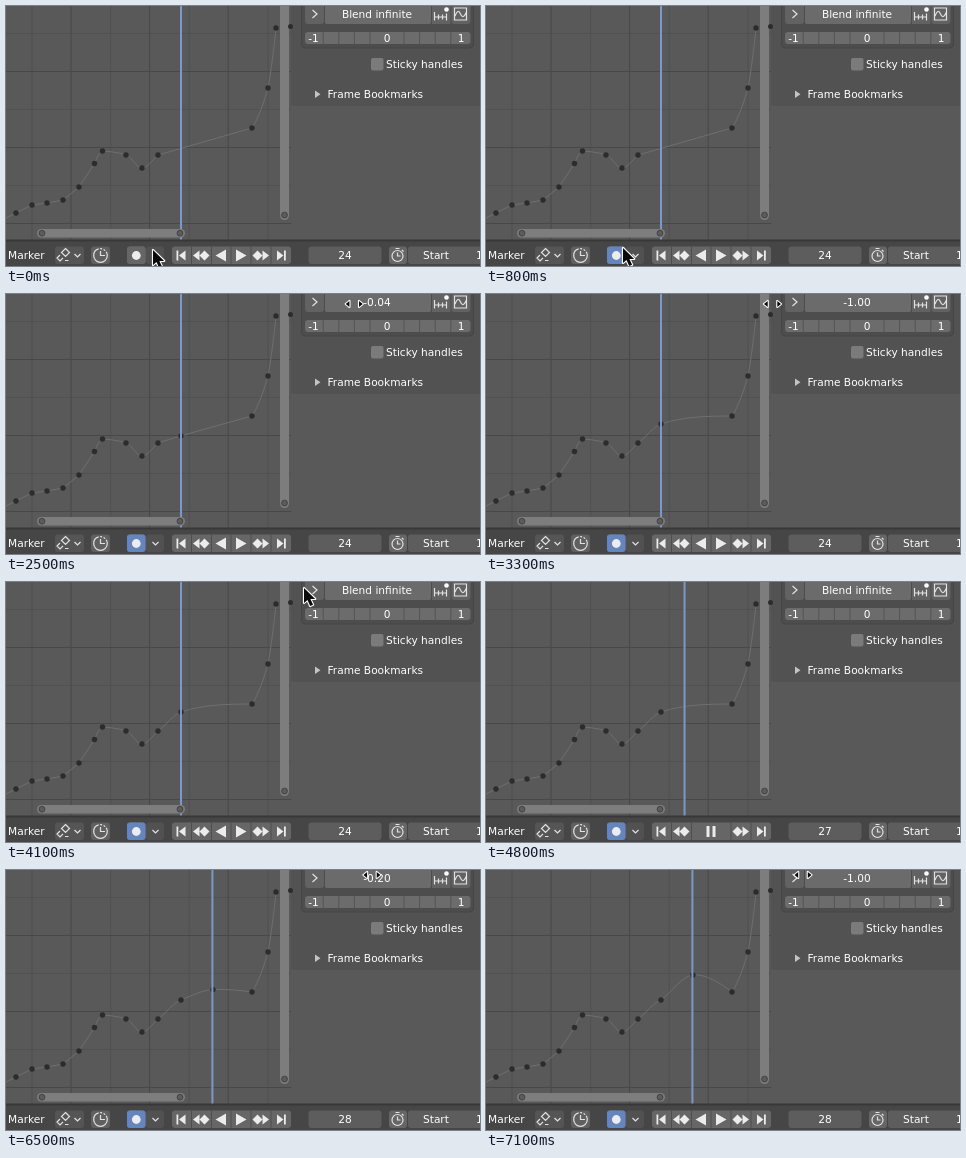
These frames come from a looping animation (474x260 px, 7200 ms). An HTML page:

```html
<!DOCTYPE html>
<html lang="en">
<head>
<meta charset="utf-8">
<title>Curve editor</title>
<style>
html, body { margin: 0; width: 100%; height: 100%; overflow: hidden; background: #595959; }
svg { display: block; width: 474px; height: 260px; }
text { font: 10.6px "DejaVu Sans", "Noto Sans", sans-serif; fill: #fff; }
.mid { text-anchor: middle; }
.icon { fill: #ececec; }
.line { fill: none; stroke: #e2e2e2; stroke-width: 1.2; }
.key { fill: #2c2c2c; }
.pointer { fill: #0a0a0a; stroke: #fff; stroke-width: 2.2; stroke-linejoin: round; paint-order: stroke; }
</style>
</head>
<body>
<svg viewBox="0 0 474 260" xmlns="http://www.w3.org/2000/svg">
  <g id="graph">
    <rect width="286" height="236" fill="#595959"/>
    <g id="grid"></g>
    <path id="curve" fill="none" stroke="#6f6f6f"/>
    <g id="keys"></g>
    <circle id="keyA" class="key" cx="175" r="2.7"/>
    <circle id="keyB" class="key" cx="207" r="2.7"/>
    <g id="playhead">
      <rect x="-1" width="2" height="234" fill="#7c98c8"/>
    </g>
    <g fill="#7d7d7d">
      <rect x="274" y="-10" width="9" height="224" rx="4.5"/>
      <rect x="31" y="223" width="148" height="8.5" rx="4.2"/>
    </g>
    <g fill="#5c5c5c" stroke="#444">
      <circle cx="278.5" cy="209" r="2.9"/>
      <circle cx="36" cy="227.2" r="2.9"/>
      <circle cx="174" cy="227.2" r="2.9"/>
    </g>
  </g>

  <g id="panel">
    <rect x="285" width="189" height="236" fill="#595959"/>
    <rect x="285" width="189" height="100" fill="#525252"/>
    <circle class="key" cx="284.5" cy="20.5" r="2.5"/>
    <rect x="295.5" y="-8" width="172" height="50" rx="4" fill="#4d4d4d" stroke="#444"/>
    <rect x="299" y="-6" width="19" height="24" rx="3" fill="#626262"/>
    <path class="line" d="M306.500 4l4.500 4-4.500 4"/>
    <rect id="slider" x="319" y="-6" width="106" height="24" rx="2"/>
    <text id="label" class="mid" x="371" y="11.500"></text>
    <rect x="426" y="-6" width="18.500" height="24" fill="#626262"/>
    <rect x="445.500" y="-6" width="19" height="24" rx="3" fill="#626262"/>
    <path class="line" d="M428.500 6v8.500M440.500 7.500v7M428 11h13M432.500 8.500v5M436.500 8.500v5"/>
    <circle cx="440.500" cy="3.500" r="2.300" fill="#fff"/>
    <path class="line" d="M448.500 2h12v12h-12zM449 10q3-8 5.500-2t6-2"/>
    <rect x="299" y="26" width="165.500" height="12" rx="3" fill="#6c6c6c"/>
    <g id="ticks"></g>
    <text class="mid" x="307.500" y="35.500">-1</text>
    <text class="mid" x="381" y="35.500">0</text>
    <text class="mid" x="455" y="35.500">1</text>
    <rect x="365" y="52" width="12.500" height="12.500" rx="2" fill="#7b7b7b"/>
    <text x="380" y="61.500">Sticky handles</text>
    <path d="M309 84.500l5.500 3.700-5.500 3.700z" fill="#c4c4c4"/>
    <text x="321.500" y="92">Frame Bookmarks</text>
  </g>

  <g id="bar">
    <rect y="234" width="474" height="26" fill="#464646"/>
    <rect y="233.500" width="474" height="2" fill="#383838"/>
    <text x="2" y="253">Marker</text>
    <g id="buttons"></g>
    <rect id="record" x="121" y="240.500" width="18.500" height="17.500" rx="3"/>
    <circle class="icon" cx="130.300" cy="249.500" r="4.400"/>
    <path class="line" d="M59.500 242.500l4 4-4 4-4-4zM54 249l-3 3 3 3 3-3M59 254.500h3.500"/>
    <path class="line" d="M68.500 248l3 3 3-3M146.500 248l3 3 3-3"/>
    <circle class="line" cx="94.500" cy="249.500" r="6.800" stroke-width="1.600" stroke-dasharray="30 1.500 2 1.500 2 1.500"/>
    <path class="line" d="M94.500 245v4.500h4.500"/>
    <g class="icon">
      <path d="M170.500 244.500h1.800v10h-1.800zM179.500 244.500v10l-6.500-5z"/>
      <path d="M193.500 244.500v10l-6.500-5zM198.500 244.500l5 5-5 5-5-5z"/>
      <path d="M256.500 244.500v10l6.500-5zM251.500 244.500l5 5-5 5-5-5z"/>
      <path d="M278 244.500h1.800v10h-1.800zM271 244.500v10l6.500-5z"/>
    </g>
    <g id="stopped" class="icon">
      <rect x="224.500" y="240.500" width="1" height="17.500" fill="#4e4e4e"/>
      <path d="M220 243.500v12l-10.500-6zM230 243.500v12l10.500-6z"/>
    </g>
    <path id="playing" class="icon" d="M220.500 244h3v11h-3zM226.500 244h3v11h-3z"/>
    <text id="frame" class="mid" x="339" y="253"></text>
    <circle class="line" cx="391.500" cy="250" r="5.500"/>
    <path class="line" d="M391.500 246.500v3.500h3M389.500 242.500h4M396 244l1.500 1.500"/>
    <text x="417" y="253">Start</text>
    <text x="470" y="253">1</text>
  </g>

  <path id="arrow" class="pointer" d="M0 0v15l3.500-3 2.700 6 2.900-1.200-2.700-5.900h4.800z"/>
  <path id="grip" class="pointer" d="M-4.800-3v6l-3.700-3zM4.800-3v6l3.700-3z"/>
</svg>
<script>
const LOOP = 7200, STEP = 100;
const $ = id => document.getElementById(id);
const rect = (x, y, w, h, fill, rx = 0) =>
  `<rect x="${x}" y="${y}" width="${w}" height="${h}" rx="${rx}" fill="${fill}"/>`;
const mix = (a, b, p) => a + (b - a) * p;
const clamp = v => Math.max(0, Math.min(1, v));
const ease = p => p * p * (3 - 2 * p);
const show = (id, on) => $(id).style.display = on ? '' : 'none';
const move = (id, x, y) => $(id).setAttribute('transform', `translate(${x} ${y})`);

// Static parts
let grid = '';
for (const odd of [1, 0]) {
  const fill = odd ? '#515151' : '#484848';
  for (let i = 0; i < 3; i++) {
    grid += rect(0, (odd ? 27 : 65) + i * 76, 286, 1, fill);
    grid += rect((odd ? 25.5 : 64.5) + i * 78.6, 0, 1, 234, fill);
  }
  if (odd) grid += rect(261.5, 0, 1, 234, fill);
}
$('grid').innerHTML = grid;

let ticks = '';
for (const side of [-1, 1])
  for (let i = 0; i < 4; i++) ticks += rect(380.5 + side * (17 + i * 15.6), 26, 1, 12, '#555');
$('ticks').innerHTML = ticks;

$('buttons').innerHTML = [
  [49, 29, '#555'], [85, 19, '#606060'], [121, 18.5, '#666'], [140, 18, '#515151'],
  [166, 119, '#666'], [302.5, 73, '#5d5d5d'], [383, 18, '#666'], [402, 80, '#5d5d5d']
].map(([x, w, c]) => rect(x, 240.5, w, 17.5, c, 3)).join('')
  + [185, 205, 244.5, 264.5].map(x => rect(x, 240.5, 1, 17.5, '#4e4e4e')).join('');

const points = [[10, 207], [26, 199], [41, 197], [57, 194], [73, 181], [88.5, 157.5],
  [96.5, 145], [120, 149], [136, 162], [152, 149], [246, 122], [262, 82], [270, 22]];
$('keys').innerHTML = points.map(([x, y]) => `<circle class="key" cx="${x}" cy="${y}" r="2.7"/>`).join('');

const head = 'M0 212L10 207L26 199L41 197L57 194L73 181L88.500 157.500' +
  'Q93 146 96.500 145S113 146 120 149S130 162 136 162S146 154 152 149';
const end = 'C250 117 258 97 262 82C265 66 268 42 270 22';

// a and b: how far the two new keys are pulled up; b < 0 means not there yet
function curvePath(a, b) {
  const ya = mix(142.4, 130, a);
  let d = `${head}C160 ${mix(146.7, 143, a)} 167 ${mix(144.7, 133, a)} 175 ${ya}`;
  if (b < 0) d += `C198 ${mix(135.8, 122.5, a)} 222 ${mix(128.9, 122, a)} 246 122`;
  else d += `C186 ${mix(126.3, 122, b)} 196 ${mix(123.7, 106, b)} 207 ${mix(123.2, 105, b)}` +
    `C219 ${mix(122.6, 103.5, b)} 234 ${mix(122, 113, b)} 246 122`;
  return d + end;
}

// Pointer stops: time, x, y
const pointer = [[0, 147, 244], [200, 147, 244], [500, 137, 242], [900, 137, 242],
  [1600, 347, 14], [1900, 351, 9], [2400, 351, 10], [3200, 286.5, 10], [3500, 286.5, 10],
  [3800, 262, 38], [4000, 277, 49], [4100, 298, 6], [4200, 298, 6], [4300, 298, -30],
  [5500, 400, -30], [5700, 388, 1], [6000, 378, 5], [6300, 378, 5], [7000, 317, 5], [7200, 317, 5]];

function pointerAt(t) {
  const i = pointer.findIndex(p => p[0] > t);
  const [t0, x0, y0] = pointer[i - 1], [t1, x1, y1] = pointer[i];
  const p = ease((t - t0) / (t1 - t0));
  return [mix(x0, x1, p), mix(y0, y1, p)];
}

function draw(t) {
  const a = ease(clamp((t - 2400) / 800));
  const b = t < 6300 ? -1 : ease(clamp((t - 6300) / 700));
  const first = t >= 2400 && t < 3500, second = t >= 6300;
  const dragging = first || second;
  const frame = 24 + [4400, 4600, 4800, 5100].filter(s => t >= s).length;
  const playing = t >= 4300 && t < 5300;
  const [x, y] = pointerAt(t);

  $('curve').setAttribute('d', curvePath(a, b));
  show('keyA', t >= 2400);
  $('keyA').setAttribute('cy', mix(142.4, 130, a));
  show('keyB', second);
  $('keyB').setAttribute('cy', mix(123.2, 105, b));
  move('playhead', 175 + (frame - 24) * 7.85, 0);

  const value = (first ? a : b).toFixed(2);
  $('label').textContent = dragging ? (value > 0 ? '-' : '') + value : 'Blend infinite';
  const hover = !dragging && x > 319 && x < 425 && y > -1 && y < 18;
  $('slider').setAttribute('fill', hover ? '#767676' : '#6b6b6b');
  $('record').setAttribute('fill', t >= 600 ? '#6585c0' : '#666');
  $('frame').textContent = frame;
  show('stopped', !playing);
  show('playing', playing);

  show('arrow', !dragging);
  show('grip', dragging);
  move(dragging ? 'grip' : 'arrow', x, y);
}

const start = performance.now();
function tick() {
  const t = (performance.now() - start) % LOOP;
  draw(Math.floor(t / STEP) * STEP);
  requestAnimationFrame(tick);
}
tick();
</script>
</body>
</html>
```
